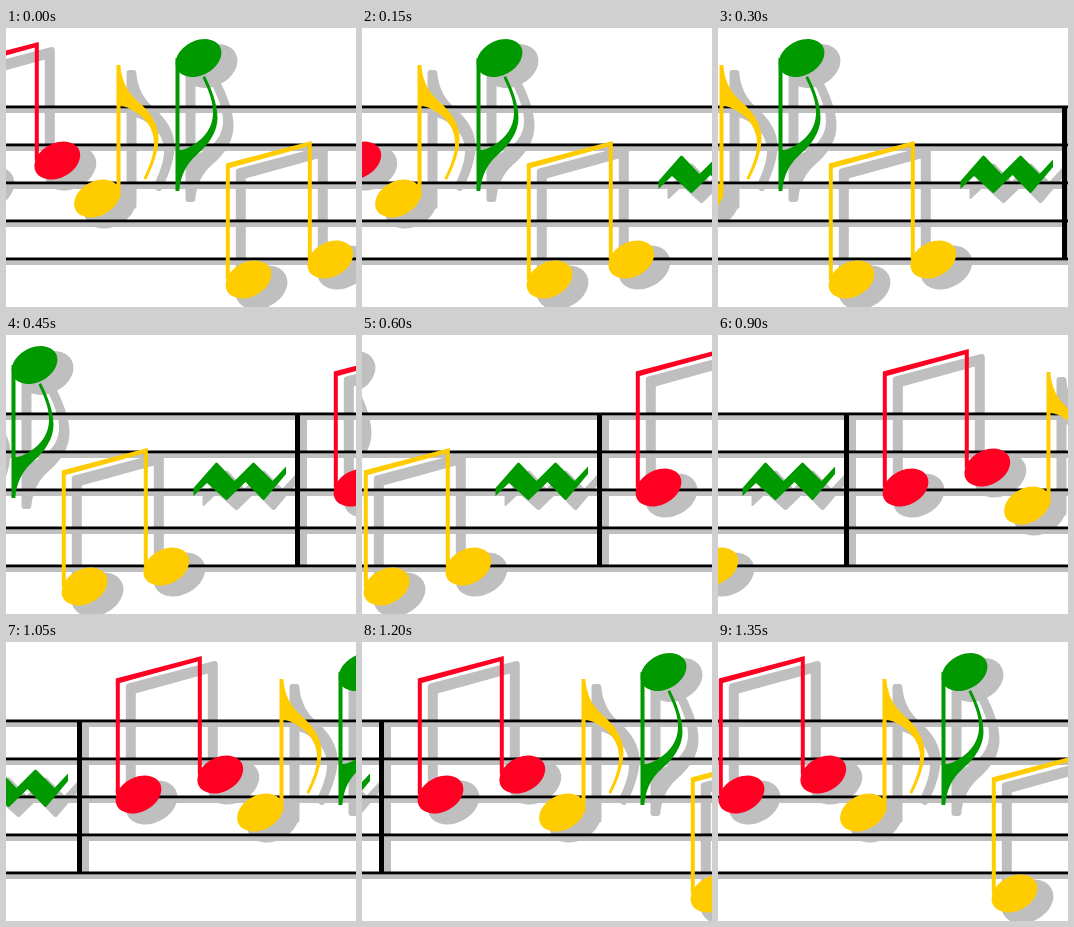
Animation, 350 px wide and 279 px high, one loop 1.5 s. Source, as an HTML page:

```html
<!DOCTYPE html>
<html lang="en">
<head>
<meta charset="utf-8">
<title>Scrolling score</title>
<style>
  html, body { margin: 0; width: 100%; height: 100%; overflow: hidden; background: #fff; }
  svg { display: block; width: 350px; height: 279px; }
  .shade { fill: #bfbfbf; stroke: #bfbfbf; stroke-linejoin: round; }
</style>
</head>
<body>
<svg viewBox="0 0 350 279" xmlns="http://www.w3.org/2000/svg">
  <defs>
    <ellipse id="head" rx="24.3" ry="17.2" transform="rotate(-28)"/>
    <!-- stem top at the origin, flag hanging to the right -->
    <path id="flag" d="M-2 0H1.8C3 15 8 26 19 36C32 47 40 60 40 73C40 87 34 102 27.5 115L25 113.5
      C31 101 36 89 35.5 77C35 64 28 54 17 47C11 43 6 41 2 41V133H-2Z"/>
    <g id="eighth">
      <use href="#flag"/>
      <use href="#head" x="-21.5" y="133.5"/>
    </g>
    <g id="eighthDown">
      <use href="#flag" transform="scale(1 -1)"/>
      <use href="#head" x="21" y="-133"/>
    </g>
    <!-- left corner of the beam at the origin -->
    <g id="pair">
      <path d="M-2 0L84 -22.5V96H80V-17L2 4.5V116H-2Z"/>
      <use href="#head" x="20.7" y="116"/>
      <use href="#head" x="102.5" y="96"/>
    </g>
    <path id="rest" d="M0 153L22 128Q23 127 24 128L41 146L59 128Q60 127 61 128L79 146L92.5 131.5V139
      L71 164.5Q70 165.5 69 164.5L52 147L34 164.5Q33 165.5 32 164.5L13.5 148L0 161Z"/>
  </defs>
  <g id="shadows"></g>
  <g id="staff"></g>
  <g id="notes"></g>
</svg>
<script>
const SPAN = 545, STEPS = 10, STEP_MS = 150;
const RED = '#ff0022', YELLOW = '#ffcc00', GREEN = '#009900';

// shape, x, y, colour, shadow offset x and y, shadow spread
const score = [
  ['eighth', 112.5, 37, YELLOW, 13, 8, 6],
  ['eighthDown', 171.5, 163, GREEN, 13, 8, 6],
  ['pair', 221.8, 135.5, YELLOW, 13, 8, 6],
  ['rest', 351.5, 0, GREEN, 10, 9, 2],
  ['pair', 493.8, 36.5, RED, 13, 8, 6]
];

const byId = id => document.getElementById(id);
const shadows = byId('shadows'), staff = byId('staff'), notes = byId('notes');

function add(parent, tag, attrs) {
  const el = document.createElementNS('http://www.w3.org/2000/svg', tag);
  for (const key in attrs) el.setAttribute(key, attrs[key]);
  parent.appendChild(el);
}

function rect(parent, x, y, width, height, fill) {
  add(parent, 'rect', { x, y, width, height, fill });
}

for (let i = 0; i < 5; i++) {
  const y = 77.5 + 38 * i;
  rect(staff, 0, y + 2, 350, 5.5, '#bfbfbf');
  rect(staff, 0, y, 350, 2.8, '#000');
}

for (const shift of [-SPAN, 0, SPAN]) {
  for (const [shape, x, y, fill, dx, dy, spread] of score) {
    const href = '#' + shape;
    add(shadows, 'use', { href, x: x + shift + dx, y: y + dy, class: 'shade', 'stroke-width': spread });
    add(notes, 'use', { href, x: x + shift, y, fill });
  }
  rect(shadows, shift + 457, 80, 8, 156, '#bfbfbf');
  rect(notes, shift + 453, 78, 5, 154, '#000');
}

const start = performance.now();
function draw() {
  const elapsed = Math.max(0, performance.now() - start);
  const step = Math.floor(elapsed / STEP_MS) % STEPS;
  const move = `translate(${-Math.round(step * SPAN / STEPS)} 0)`;
  shadows.setAttribute('transform', move);
  notes.setAttribute('transform', move);
  requestAnimationFrame(draw);
}
draw();
</script>
</body>
</html>
```
